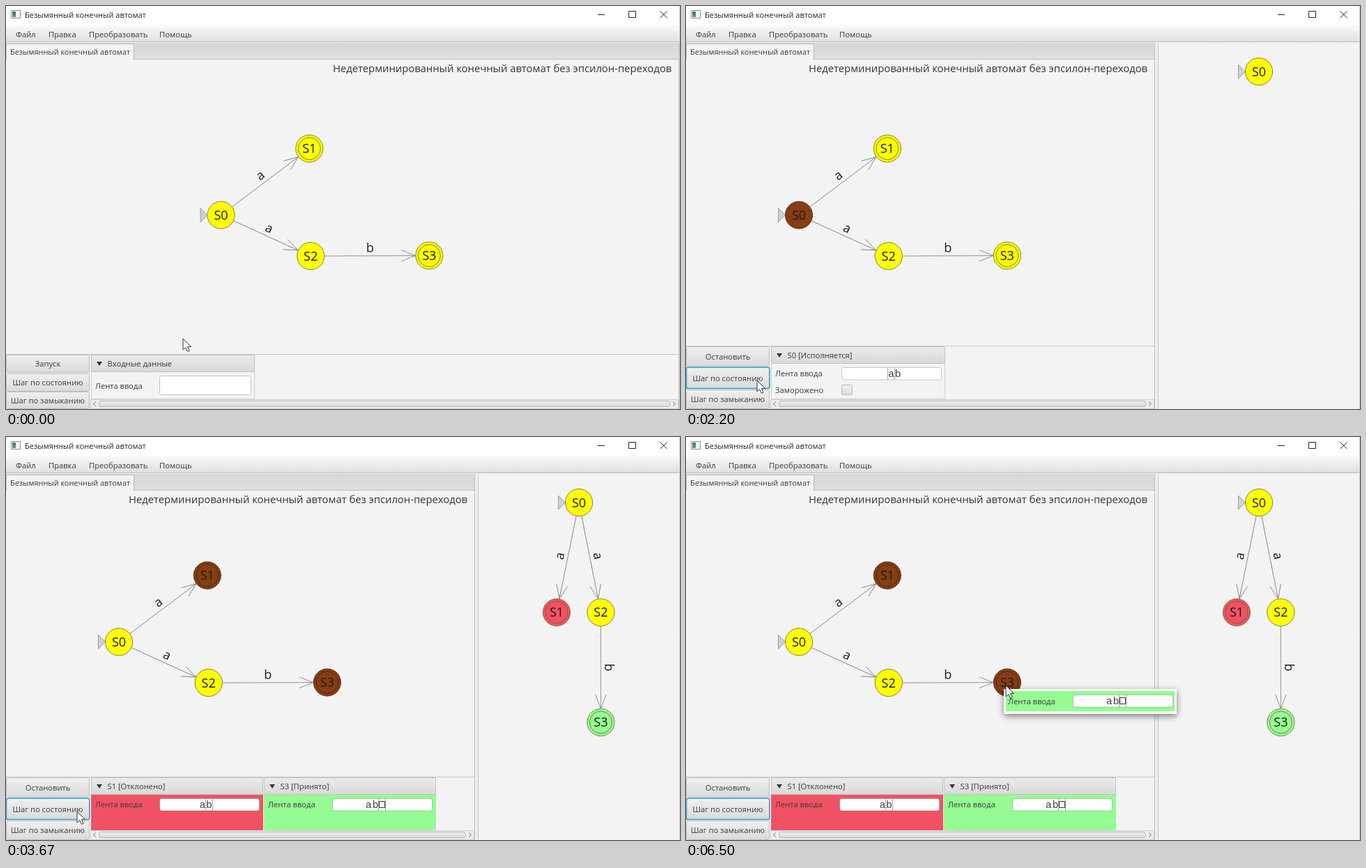
Animation of 967 by 579 pixels, one loop 6570 ms. Source, as an HTML page with a canvas:

```html
<!DOCTYPE html>
<html lang="ru">
<head>
<meta charset="utf-8">
<style>
html, body { margin: 0; width: 100%; height: 100%; overflow: hidden; background: #f3f3f3; }
canvas { display: block; }
</style>
</head>
<body>
<canvas id="stage" width="967" height="579"></canvas>
<script>
const LOOP = 6570, TYPE_A = 730, TYPE_B = 970, FOCUS = 600, TOOLTIP = 5770;
const STEPS = [2200, 2930, 3500];
const YELLOW = '#fdfe05', BROWN = '#863d14', RED = '#f05264', GREEN = '#95fb92';
const SANS = '"Open Sans", "Noto Sans", sans-serif', MONO = '"Liberation Mono", monospace';
const ctx = document.getElementById('stage').getContext('2d');

// time, x, y of the pointer
const PATH = [
  [0, 254, 478], [100, 254, 478], [330, 254, 518], [560, 255, 542], [1200, 255, 542],
  [1480, 190, 546], [1800, 105, 537], [1950, 102, 538], [4430, 102, 538],
  [4670, 150, 530], [5170, 400, 385], [5400, 459, 357], [LOOP, 459, 357]
];

const NFA = { S0: [308.5, 300.4], S1: [435.3, 204.8, true], S2: [437.2, 359.2], S3: [607.3, 358.6, true] };
const TREE = { S0: [822, 94.2], S1: [790, 252, true], S2: [853.4, 252], S3: [853.4, 410, true] };
const EDGES = [['S0', 'S1', 'a'], ['S0', 'S2', 'a'], ['S2', 'S3', 'b']];

function text(s, x, y, size = 11.2, align = 'left', color = '#3a3a3a', font = SANS) {
  ctx.font = `${size}px ${font}`;
  ctx.textAlign = align;
  ctx.fillStyle = color;
  ctx.fillText(s, x, y + size * 0.36);
}

function rect(x, y, w, h, fill, stroke, r = 0, width = 1) {
  ctx.beginPath();
  ctx.roundRect(x, y, w, h, r);
  if (fill) { ctx.fillStyle = fill; ctx.fill(); }
  if (stroke) { ctx.strokeStyle = stroke; ctx.lineWidth = width; ctx.stroke(); }
}

function lines(color, width, ...paths) {
  ctx.strokeStyle = color;
  ctx.lineWidth = width;
  ctx.beginPath();
  for (const [x, y, ...rest] of paths) {
    ctx.moveTo(x, y);
    for (let i = 0; i < rest.length; i += 2) ctx.lineTo(rest[i], rest[i + 1]);
  }
  ctx.stroke();
}

function polygon(fill, stroke, ...p) {
  ctx.beginPath();
  for (let i = 0; i < p.length; i += 2) ctx.lineTo(p[i], p[i + 1]);
  ctx.closePath();
  ctx.fillStyle = fill;
  ctx.fill();
  if (stroke) { ctx.strokeStyle = stroke; ctx.lineWidth = 1; ctx.stroke(); }
}

function shade(y, h, top, bottom) {
  const g = ctx.createLinearGradient(0, y, 0, y + h);
  g.addColorStop(0, top);
  g.addColorStop(1, bottom);
  return g;
}

function edge([x1, y1], [x2, y2], label) {
  const dx = x2 - x1, dy = y2 - y1, len = Math.hypot(dx, dy), back = dx < -1;
  ctx.save();
  ctx.translate(x1, y1);
  ctx.rotate(Math.atan2(dy, dx));
  const tip = len - 20;
  lines('#777', 0.8, [20, 0, tip, 0], [tip - 20, -8, tip, 0, tip - 20, 8]);
  ctx.translate(len / 2, 0);
  if (back) ctx.rotate(Math.PI);
  text(label, 0, -12, 18, 'center', '#1c1c1c');
  ctx.restore();
}

function node(name, [x, y, final], color) {
  const rings = final ? [20, 16.4] : [20];
  for (const r of rings) {
    ctx.beginPath();
    ctx.arc(x, y, r - 0.4, 0, 7);
    ctx.fillStyle = color;
    ctx.fill();
    ctx.strokeStyle = color === BROWN ? '#4a220c' : '#66662c';
    ctx.lineWidth = 0.8;
    ctx.stroke();
  }
  text(name, x, y, 18, 'center', '#1c1c1c');
}

function graph(nodes, colors, dx = 0, dy = 0, shown = 4) {
  ctx.save();
  ctx.translate(dx, dy);
  const names = Object.keys(nodes).slice(0, shown);
  for (const [a, b, label] of EDGES)
    if (names.includes(b)) edge(nodes[a], nodes[b], label);
  const [x, y] = nodes.S0;
  polygon('#d2d2d2', '#999', x - 29.5, y - 10, x - 20, y, x - 29.5, y + 10);
  for (const n of names) node(n, nodes[n], colors[n] || YELLOW);
  ctx.restore();
}

function button(label, y, h, focused) {
  rect(0.5, y + 0.5, 119, h - 1, shade(y, h, '#f0f0f0', '#dadada'), '#bcbcbc', 2);
  if (focused) rect(0.5, y + 0.3, 119.3, h - 0.8, null, '#2f9fc9', 2, 1.6);
  text(label, 60, y + h / 2, 11.2, 'center');
}

function panel(title, x, y, w, body, border = '#cfcfcf') {
  rect(x + 0.5, y + 0.5, w - 1, 564 - y, body, border);
  rect(x + 0.5, y + 0.5, w - 1, 24, shade(y, 24, '#ebebeb', '#d9d9d9'), '#c2c2c2');
  polygon('#333', null, x + 8, y + 10, x + 16, y + 10, x + 12, y + 16);
  text(title, x + 23.5, y + 12.5);
}

// The read head stays centred; the symbols slide under it.
function tape(x, y, head) {
  rect(x + 0.5, y + 0.5, 143, 17.5, '#fff', 'rgba(0,0,0,.2)', 3);
  const left = x + 67;
  lines('#a5a5a5', 1, [left - 0.5, y + 1, left - 0.5, y + 18], [left + 9.5, y + 1, left + 9.5, y + 18]);
  [...'ab'].forEach((c, i) => text(c, left + 4.5 + (i - head) * 9.6, y + 9, 15, 'center', '#444', MONO));
  if (head === 2) rect(left + 0.5, y + 4.5, 8, 9, null, '#333');
}

function process(state, x, w, head, color) {
  const running = !color;
  panel(state, x, 489, w, color || '#f3f3f3', color);
  text('Лента ввода', x + 6, 528);
  tape(x + (running ? 101 : 98), 519, head);
  if (running) {
    text('Заморожено', x + 6, 551.5);
    rect(x + 101.5, 544.5, 15, 14, shade(544, 15, '#f0f0f0', '#dcdcdc'), '#b8b8b8', 2);
  }
}

function scrollbar(right) {
  rect(121.5, 565.5, right - 122, 13, '#ececec', '#cfcfcf');
  rect(133.5, 567.5, right - 146, 8, shade(567, 8, '#eee', '#dcdcdc'), '#b5b5b5', 3);
  const r = right - 8;
  lines('#777', 1, [129, 568.5, 125.5, 571.5, 129, 574.5], [r, 568.5, r + 3.5, 571.5, r, 574.5]);
}

function windowFrame(right) {
  rect(0, 0, 967, 579, '#f3f3f3');
  rect(0, 0, 967, 27, '#fff');
  rect(7.5, 6.5, 13, 11, '#f6f6f6', '#8c8c8c');
  rect(9, 8, 5, 8, shade(8, 8, '#3c6f7c', '#5f9a8a'));
  text('Безымянный конечный автомат', 27, 13, 11, 'left', '#222');
  lines('#222', 1, [849, 12.5, 859, 12.5], [938.5, 7.5, 948.5, 17], [948.5, 7.5, 938.5, 17]);
  rect(893.5, 7.5, 10, 9, null, '#222');
  rect(0, 27, 967, 25, shade(27, 25, '#fafafa', '#dedede'));
  lines('#bcbcbc', 1, [0, 51.5, 967, 51.5]);
  [['Файл', 14], ['Правка', 61], ['Преобразовать', 119], ['Помощь', 220]]
    .forEach(([s, x]) => text(s, x, 40.5));
  rect(0, 53, right, 24, shade(53, 24, '#d6d6d6', '#e0e0e0'));
  lines('#bdbdbd', 1, [0, 76.5, right, 76.5], [right - 0.5, 53, right - 0.5, 579]);
  polygon('#f3f3f3', null, 1, 54, 184, 54, 184, 77, 1, 77);
  lines('#b8b8b8', 1, [0.5, 77, 0.5, 54.5, 183.5, 54.5, 183.5, 77]);
  text('Безымянный конечный автомат', 6, 66, 10.9);
  text('Недетерминированный конечный автомат без эпсилон-переходов', right - 11, 89.5, 14.8, 'right', '#333');
  lines('#c8c8c8', 1, [966.5, 0, 966.5, 579]);
}

function editor(t) {
  windowFrame(966);
  graph(NFA, {});
  lines('#c8c8c8', 1, [0, 500.5, 966, 500.5]);
  button('Запуск', 501, 26);
  button('Шаг по состоянию', 528, 26);
  button('Шаг по замыканию', 554, 25);
  panel('Входные данные', 122, 501, 235, '#f3f3f3');
  text('Лента ввода', 128, 545.5);
  const focused = t >= FOCUS;
  rect(220.5, 531.5, 131, 27, '#fff', focused ? '#2fa3cc' : '#c4c4c4', 3, focused ? 1.8 : 1);
  const typed = t < TYPE_A ? '' : t < TYPE_B ? 'a' : 'ab';
  text(typed, 230.5, 545, 15, 'left', '#444', MONO);
  if (focused) {
    const x = 230.5 + typed.length * 9;
    lines('#222', 1, [x, 537, x, 554]);
  }
  scrollbar(965);
}

function runner(step, t) {
  windowFrame(673);
  rect(673, 53, 5, 526, '#efefef');
  lines('#c4c4c4', 1, [677.5, 53, 677.5, 579]);
  const active = [{ S0: BROWN }, { S1: BROWN, S2: BROWN }, { S1: BROWN, S3: BROWN }][step - 1];
  graph(NFA, active, -146.5, step === 1 ? 0 : -6);
  graph(TREE, step === 3 ? { S1: RED, S3: GREEN } : {}, 0, 0, [1, 3, 4][step - 1]);
  lines('#c8c8c8', 1, [0, 488.5, 673, 488.5]);
  button('Остановить', 489, 29);
  button('Шаг по состоянию', 519, 31, true);
  button('Шаг по замыканию', 551, 28);
  if (step === 1) process('S0 [Исполняется]', 122, 250, 0);
  if (step === 2) {
    process('S1 [Исполняется]', 122, 250, 1);
    process('S2 [Исполняется]', 372, 250, 1);
  }
  if (step === 3) {
    process('S1 [Отклонено]', 122, 247, 1, RED);
    process('S3 [Принято]', 370, 247, 2, GREEN);
  }
  scrollbar(672);
  if (t >= TOOLTIP) {
    ctx.save();
    ctx.shadowColor = 'rgba(0,0,0,.5)';
    ctx.shadowBlur = 9;
    ctx.shadowOffsetY = 3;
    rect(456, 362, 248, 36, '#f6f6f6');
    ctx.restore();
    rect(459, 365, 242, 29, GREEN);
    text('Лента ввода', 462, 380);
    tape(555, 370, 2);
  }
}

function pointer(t) {
  const i = PATH.findIndex(p => p[0] > t);
  const [t0, x0, y0] = PATH[i - 1], [t1, x1, y1] = PATH[i];
  const k = (t - t0) / (t1 - t0), x = x0 + (x1 - x0) * k, y = y0 + (y1 - y0) * k;
  if (t < STEPS[0] && x > 220 && y > 531) {
    const cx = Math.round(x) - 0.5;
    lines('#222', 1, [cx, y - 7, cx, y + 7], [cx - 3, y - 7.5, cx + 3, y - 7.5], [cx - 3, y + 7.5, cx + 3, y + 7.5]);
    return;
  }
  ctx.save();
  ctx.translate(x, y);
  polygon('#fff', '#333', 0, 0, 0, 16, 3.8, 12.6, 6.4, 18.4, 9, 17.2, 6.4, 11.6, 11.4, 11.4);
  ctx.restore();
}

function draw(now) {
  const t = now % LOOP, step = STEPS.filter(s => t >= s).length;
  if (step) runner(step, t);
  else editor(t);
  pointer(t);
  requestAnimationFrame(draw);
}
requestAnimationFrame(draw);
</script>
</body>
</html>
```
